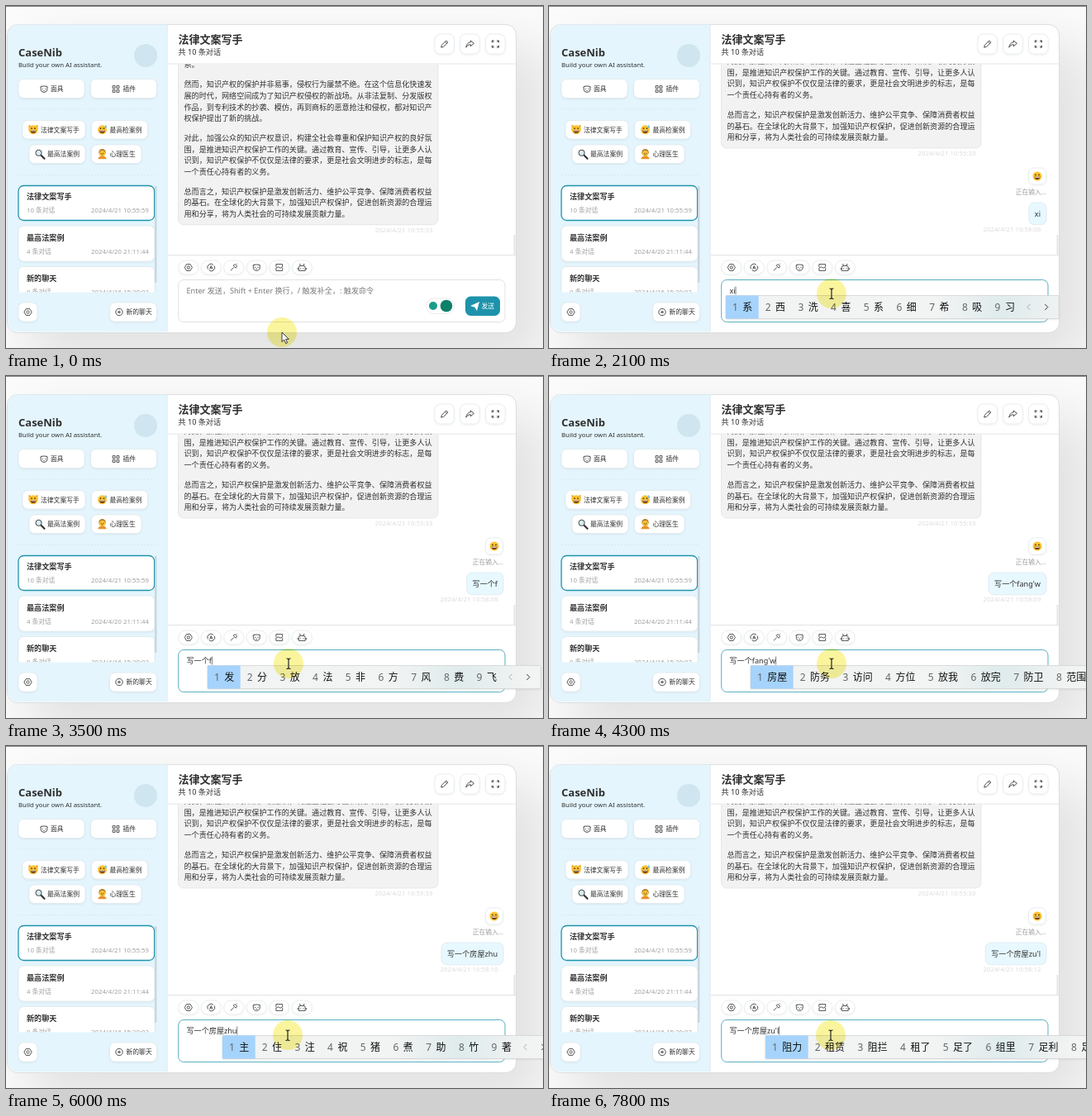
Recreate the animation shown at these times as an HTML page. Size 650 by 414 pixels, loop 8000 ms.

```html
<!DOCTYPE html>
<html lang="zh-CN">
<head>
<meta charset="utf-8">
<style>
html, body { margin: 0; width: 100%; height: 100%; overflow: hidden; background: #fbfbfb; }
svg { display: block; position: absolute; left: 0; top: 0; }
text { font-family: "Noto Sans", "Noto Sans CJK SC", "Noto Sans CJK", sans-serif; white-space: pre; }
#win { position: absolute; left: 1px; top: 22px; width: 615px; height: 372px; border: 1px solid #dedede;
  border-radius: 13px; background: #fff; box-shadow: 32px 32px 65px 6px rgba(0,0,0,.1); }
</style>
</head>
<body>
<div id="win"></div>
<svg id="stage" width="650" height="414" viewBox="0 0 650 414"></svg>
<script>
const INK = '#303030', TEAL = '#1d93ab', GRAY = '#a0a0a0', PALE = '#dcdcdc', LINE = '#e2e2e2';

// Text is placed by its vertical centre.
const text = (x, cy, size, str, fill = INK, extra = '') =>
  `<text x="${x}" y="${cy + size * .37}" font-size="${size}" fill="${fill}" ${extra}>${str}</text>`;
const END = 'text-anchor="end"', BOLD = 'font-weight="700"';
const box = (x, y, w, h, r = 6.5, fill = '#fff', stroke = LINE, extra = '') =>
  `<rect x="${x}" y="${y}" width="${w}" height="${h}" rx="${r}" fill="${fill}" stroke="${stroke}" ${extra}/>`;
const card = (x, y, w, h, r) => box(x, y, w, h, r, '#fff', '#dfe7ea', 'stroke-width=".7" filter="url(#soft)"');
const dot = (x, y, r, fill, extra = '') => `<circle cx="${x}" cy="${y}" r="${r}" fill="${fill}" ${extra}/>`;
const line = (d, stroke, extra = '') => `<path d="${d}" fill="none" stroke="${stroke}" ${extra}/>`;

// Icons on a 16-unit grid centred on 0,0.
const ICONS = {
  gear: 'M-3.5-6H3.5L7 0 3.5 6H-3.5L-7 0ZM2.5 0a2.5 2.5 0 1 1-5 0a2.5 2.5 0 1 1 5 0',
  auto: 'M-6 3A6.5 6.5 0 0 1 4-5M6-3A6.5 6.5 0 0 1-4 5M-2.5 3L0-3 2.5 3M-1.6 1H1.6',
  wand: 'M-6 6L0 0M-1-3.5A3.4 3.4 0 1 1 3.5 1ZM5-6.5L6-7',
  mask: 'M-3.5-5Q0-6 3.5-5A2 2 0 0 1 6-2C7 3 4 6 0 6S-7 3-6-2A2 2 0 0 1-3.5-5ZM-3.5 1L-2-1M3.5 1L2-1M-1 3H1M-4-5L-6-3M4-5L6-3',
  cut: 'M-6-1V-6H6V-1M-6 1V6H6V1M-6 1L-2-1 2 1 6-1',
  robot: 'M-6 0Q-6-3-3-3H3Q6-3 6 0V6H-6ZM-3-3L-4-7M3-3L4-7M-2.5 1V2.5M2.5 1V2.5M-8 1V4M8 1V4',
  grid: 'M-6-6H-1.5V-1.5H-6ZM1.5-6H6V-1.5H1.5ZM-6 1.5H-1.5V6H-6ZM1.5 1.5H6V6H1.5Z',
  plus: 'M6.5 0a6.5 6.5 0 1 1-13 0a6.5 6.5 0 1 1 13 0M-3 0H3M0-3V3',
  pen: 'M-6 6L-5 2 3-6 6-3-2 5ZM1-4L4-1',
  share: 'M1-6L7-1 1 4V1C-3 1-5 3-7 6C-6 0-3-3 1-3Z',
  full: 'M-6-2.5V-6H-2.5M2.5-6H6V-2.5M6 2.5V6H2.5M-2.5 6H-6V2.5M-6-6L-3-3M6-6L3-3M6 6L3 3M-6 6L-3 3',
};
const icon = (name, x, y, s = .65) =>
  `<path transform="translate(${x} ${y}) scale(${s})" d="${ICONS[name]}" fill="none" stroke="#333" stroke-width="1.3" stroke-linejoin="round"/>`;

const at = (x, y, body) => `<g transform="translate(${x} ${y})">${body}</g>`;
const grin = dot(0, 0, 5.5, '#fcc532') + dot(-2, -1.6, .9, '#5b3a12') + dot(2, -1.6, .9, '#5b3a12') +
  '<path d="M-3.4 .6H3.4A3.4 3.4 0 0 1-3.4 .6Z" fill="#6b3415"/><path d="M-2.8 .8H2.8V1.7H-2.8Z" fill="#fff"/>';
const sweat = grin + '<path d="M4-6Q7-2 4.5-2T4-6Z" fill="#6cc3ee"/>';
const cat = '<path d="M-5.5-6L-1-4 1-4 5.5-6 5.5 1H-5.5Z" fill="#f0a926"/>' + grin;
const lens = line('M1 1L5.5 5.5', '#333', 'stroke-width="2.2" stroke-linecap="round"') +
  dot(-1.5, -1.5, 3.6, '#d5ebf5', 'stroke="#444"');
const person = '<path d="M-5 6C-5 1 5 1 5 6Z" fill="#e8912c"/>' + dot(0, -2, 4.2, '#b5812c') +
  dot(0, -.8, 3.5, '#fcc532') + dot(-1.3, -1, .6, '#432') + dot(1.3, -1, .6, '#432') + line('M-1.2 .8H1.2', '#643', 'stroke-width=".7"');

const chip = (x, y, w, art, label) =>
  card(x, y, w, 22.5) + at(x + 13, y + 11.3, art) + text(x + 22, y + 11.5, 7.8, label);

const chat = (y, title, count, time) =>
  text(25, y + 14, 9.1, title, INK, BOLD) + text(25, y + 30.2, 7.8, count + ' 条对话', GRAY) +
  text(173, y + 30.2, 7.8, time, GRAY, END);

const sidebar = `<path d="M195 22.5V394.5H15A13 13 0 0 1 2 381.5V35.5A13 13 0 0 1 15 22.5Z" fill="#e4f5fd"/>` +
  line('M195 23V394', '#d9e9f0') +
  text(15, 56.5, 13, 'CaseNib', INK, BOLD) + text(15, 70.7, 7.8, 'Build your own AI assistant.') +
  dot(169, 60, 14, '#cfe5ef') +
  card(15, 88.5, 80, 23) + icon('mask', 46, 100.5) + text(54, 100.5, 7.8, '面具') +
  card(102.5, 88.5, 80, 23) + icon('grid', 133, 100.5) + text(141.5, 100.5, 7.8, '插件') +
  line('M15 125H181M15 204.5H181', '#d3e3ea', 'stroke-width=".7" stroke-dasharray="2 2"') +
  chip(20, 138.5, 76, cat, '法律文案写手') + chip(103.5, 138.5, 68, sweat, '最高检案例') +
  chip(28, 168, 68, lens, '最高法案例') + chip(103.5, 168, 60.5, person, '心理医生') +
  '<g clip-path="url(#list)">' +
  box(15, 217.5, 164.6, 42, 6.5, '#fff', TEAL, 'stroke-width="1.3"') + chat(217, '法律文案写手', 10, '2024/4/21 10:55:59') +
  card(15, 266, 165, 43) + chat(266.5, '最高法案例', 4, '2024/4/20 21:11:44') +
  card(15, 315.5, 165, 43) + chat(316, '新的聊天', 0, '2024/4/16 15:20:02') + '</g>' +
  '<rect x="180" y="218" width="2.4" height="117" rx="1" fill="#c9d6dc"/>' +
  card(15, 359, 23, 23) + icon('gear', 26.5, 370.5) +
  card(125.5, 359, 57, 23) + icon('plus', 137, 370.5) + text(145.5, 370.5, 7.8, '新的聊天');

const header = text(208.5, 40.4, 13, '法律文案写手', INK, BOLD) + text(208.5, 55.3, 9.1, '共 10 条对话') +
  ['pen', 'share', 'full'].map((n, i) => card(519 + i * 30.8, 34, 23.5, 24) + icon(n, 530.8 + i * 30.8, 46, .68)).join('') +
  line('M196 70H617', '#e6e6e6');

const article = [
  [70.6, '系。'],
  [95, '然而，知识产权的保护并非易事，侵权行为屡禁不绝。在这个信息化快速发', '展的时代，网络空间成为了知识产权侵权的新战场。从非法复制、分发版权',
    '作品，到专利技术的抄袭、模仿，再到商标的恶意抢注和侵权，都对知识产', '权保护提出了新的挑战。'],
  [159.6, '对此，加强公众的知识产权意识，构建全社会尊重和保护知识产权的良好氛', '围，是推进知识产权保护工作的关键。通过教育、宣传、引导，让更多人认',
    '识到，知识产权保护不仅仅是法律的要求，更是社会文明进步的标志，是每', '一个责任心持有者的义务。'],
  [224.3, '总而言之，知识产权保护是激发创新活力、维护公平竞争、保障消费者权益', '的基石。在全球化的大背景下，加强知识产权保护，促进创新资源的合理运',
    '用和分享，将为人类社会的可持续发展贡献力量。'],
].map(([y, ...rows]) => rows.map((row, i) => text(215.5, y + i * 13.6, 9.1, row)).join('')).join('');

const messages = '<g clip-path="url(#log)"><g id="scroll">' + box(208.5, -60, 314.5, 324.7, 6.5, '#f2f2f2', '#e0e0e0', 'stroke-width=".7"') +
  article + text(516.5, 271, 7.8, '2024/4/21 10:55:33', PALE, END) + '</g>' +
  '<g id="draft">' + card(580.5, 196, 21, 20) + at(591, 206, grin) + text(602, 225, 7.8, '正在输入…', GRAY, END) +
  box(0, 238, 0, 26.8, 6.5, '#e7f8ff', '#d8e6ec', 'id="bubble" stroke-width=".7"') + text(595, 251.5, 9.1, '', INK, 'id="said" ' + END) +
  text(595.5, 270.5, 7.8, '', PALE, 'id="stamp" ' + END) + '</g></g>' +
  '<rect x="614.5" y="277" width="2" height="24" fill="#e6e6e6"/>';

const composer = line('M196 301.5H617', '#e2e2e2') +
  ['gear', 'auto', 'wand', 'mask', 'cut', 'robot'].map((n, i) => card(208.8 + i * 27.5, 308, 24, 17, 8.5) + icon(n, 220.8 + i * 27.5, 316.5)).join('') +
  box(208.7, 331.5, 395.3, 51, 6.5, '#fff', LINE, 'id="field"') +
  text(218.5, 345, 9.1, 'Enter 发送，Shift + Enter 换行，/ 触发补全，: 触发命令', '#7b7b7b', 'id="hint"') +
  text(218.5, 344.5, 9.1, '', INK, 'id="typed"') + '<rect id="caret" y="339.5" width=".7" height="10" fill="#444"/>' +
  box(508.5, 354, 34, 18.5, 9, '#fff', '#e4e4e4', 'stroke-width=".7"') + dot(517, 363, 5, '#1a9c8d') + dot(533, 363, 7.3, '#0e8169') +
  box(556, 351.5, 42, 23.5, 6.5, TEAL, 'none') + '<path d="M562 363L573 358 570 369 567.5 364.8Z" fill="#fff"/>' +
  text(575.5, 363.3, 7.8, '发送', '#fff');

const pointer = '<g id="mouse">' + dot(0, 0, 18, '#f9f48c', 'opacity=".85" style="mix-blend-mode:multiply"') +
  '<path id="arrow" d="M0 0V11.5L2.7 9 4.6 13.5 6.6 12.6 4.7 8.3H8.3Z" fill="#fff" stroke="#222" stroke-width=".9"/>' +
  line('M-2.5-6Q0-6 0-4.5V5Q0 6.5-2.5 6.5M2.5-6Q0-6 0-4.5V5Q0 6.5 2.5 6.5', '#222', 'id="beam" stroke-width="1.2"') + '</g>';

const stage = document.getElementById('stage');
stage.innerHTML = `<defs>
  <clipPath id="list"><rect x="10" y="214" width="175" height="132.5"/></clipPath>
  <clipPath id="log"><rect x="196" y="70.3" width="420" height="231"/></clipPath>
  <filter id="soft" x="-20%" y="-20%" width="140%" height="150%"><feDropShadow dx="0" dy="1" stdDeviation="1" flood-opacity=".07"/></filter>
  <linearGradient id="glass" gradientUnits="userSpaceOnUse" x1="470" x2="630"><stop stop-color="#f2f3f3"/>
  <stop offset=".5" stop-color="#dfebec"/><stop offset="1" stop-color="#f2f3f3"/></linearGradient></defs>
  <rect width="650" height="1" fill="#858585"/>` +
  sidebar + header + messages + composer + '<g id="ime"></g>' + pointer;
const $ = id => document.getElementById(id);

// Typing script: start in ms, text, left edge of the candidate bar, candidates.
const zh = '中 这 之 张 找 至 真 着 者', z = '在 中 这 做 再 赞 之 张 找';
const SCRIPT = [
  [0, ''],
  [1900, 'x', 214, '下 想 小 新 向 些 先 学 像'],
  [2000, 'xi', 214, '系 西 洗 喜 系 细 希 吸 习'],
  [2200, 'xie', 214, '写 些 谢 鞋 斜 协 歇 血 泻'],
  [2400, "xie'y", 214, '谢谊 协议 写一 写有 谢意 写于 歇业 写也'],
  [2500, "xie'yi", 214, '协议 写一 写意 谢意 歇一 斜一 鞋一 些以'],
  [2600, "xie'yi'g", 214, '写一个 协议跟 协议 写意 谢意 谢毅 谢衣 惬(qiè)'],
  [2700, "xie'yi'ge", 214, '写一个 协议 写意 谢意 谢毅 谢衣 写 些'],
  [3000, '写一个'],
  [3400, '写一个f', 244, '发 分 放 法 非 方 风 费 飞'],
  [3800, '写一个fa', 244, '发 法 罚 乏 伐 阀 筏 珐 垡'],
  [3900, '写一个fan', 244, '饭 反 翻 烦 犯 返 番 凡 范'],
  [4000, '写一个fang', 244, '放 方 房 防 访 仿 芳 妨 纺'],
  [4200, "写一个fang'w", 244, '房屋 防务 访问 方位 放我 放完 防卫 范围'],
  [4400, "写一个fang'wu", 244, '房屋 防务 方物 放屋 放 方 房 防'],
  [4900, '写一个房屋'],
  [5200, '写一个房屋z', 262, z],
  [5400, '写一个房屋zh', 262, zh],
  [5600, '写一个房屋zhu', 262, '主 住 注 祝 猪 煮 助 竹 著'],
  [6300, '写一个房屋zh', 262, zh],
  [7000, '写一个房屋z', 262, z],
  [7200, '写一个房屋zu', 262, '组 租 足 族 阻 祖 卒 诅 镞'],
  [7400, "写一个房屋zu'l", 262, '阻力 租赁 阻拦 租了 足了 组里 足利 足量'],
];

function candidates(left, words) {
  if (!words) return '';
  let x = left + 8, out = '', first;
  words.split(' ').forEach((word, i) => {
    out += text(x, 364.5, 12, i + 1, '#666') + text(x + 12.3, 364.5, 12, word, '#111');
    x += 27.7 + 12 * word.length;
    first ??= x - left - 8;
  });
  out += line(`M${x + 3} 361l-3.5 3.5 3.5 3.5`, '#aaa') + line(`M${x + 21} 361l3.5 3.5-3.5 3.5`, '#333');
  return box(left, 350.5, x + 38 - left, 28, 1, 'url(#glass)', '#d2d2d2', 'stroke-width=".8" filter="url(#soft)"') +
    `<rect x="${left}" y="350.5" width="${first}" height="28" fill="#a5d3fb"/>` + out;
}

let shown;
function show(step) {
  if (step === shown) return;
  shown = step;
  const [start, str, left, words] = step;
  $('typed').textContent = $('said').textContent = str;
  const w = str ? $('typed').getComputedTextLength() : 0;
  $('hint').style.display = str ? 'none' : '';
  $('draft').style.display = str ? '' : 'none';
  $('scroll').setAttribute('transform', `translate(0 ${str ? -92.7 : 0})`);
  $('bubble').setAttribute('x', 588 - w);
  $('bubble').setAttribute('width', w + 14);
  $('caret').setAttribute('x', 218.5 + w);
  $('stamp').textContent = '2024/4/21 10:58:' + String(Math.floor(start / 1000 + 4.9)).padStart(2, '0');
  $('ime').innerHTML = candidates(left, words);
}

// Pointer stops: ms, x, y.
const PATH = [[0, 334, 395], [50, 334, 395], [900, 345, 350], [950, 345, 350], [1400, 342, 348], [4550, 342, 348], [4700, 341, 350], [8000, 341, 350]];
function pointerAt(t) {
  const i = PATH.findIndex(p => p[0] > t), [t0, x0, y0] = PATH[i - 1], [t1, x1, y1] = PATH[i];
  let k = (t - t0) / (t1 - t0);
  k = k * k * (3 - 2 * k);
  return [x0 + (x1 - x0) * k, y0 + (y1 - y0) * k];
}

function frame(now) {
  const t = now % 8000, step = SCRIPT.findLast(s => s[0] <= t), [x, y] = pointerAt(t);
  show(step);
  const inside = y < 382;
  $('mouse').setAttribute('transform', `translate(${x} ${y})`);
  $('arrow').style.display = inside ? 'none' : '';
  $('beam').style.display = inside ? '' : 'none';
  $('field').setAttribute('stroke', t >= 900 ? '#5aafc0' : LINE);
  $('caret').style.display = step[1] || (t >= 900 && t < 1400) ? '' : 'none';
  requestAnimationFrame(frame);
}
frame(0);
</script>
</body>
</html>
```
